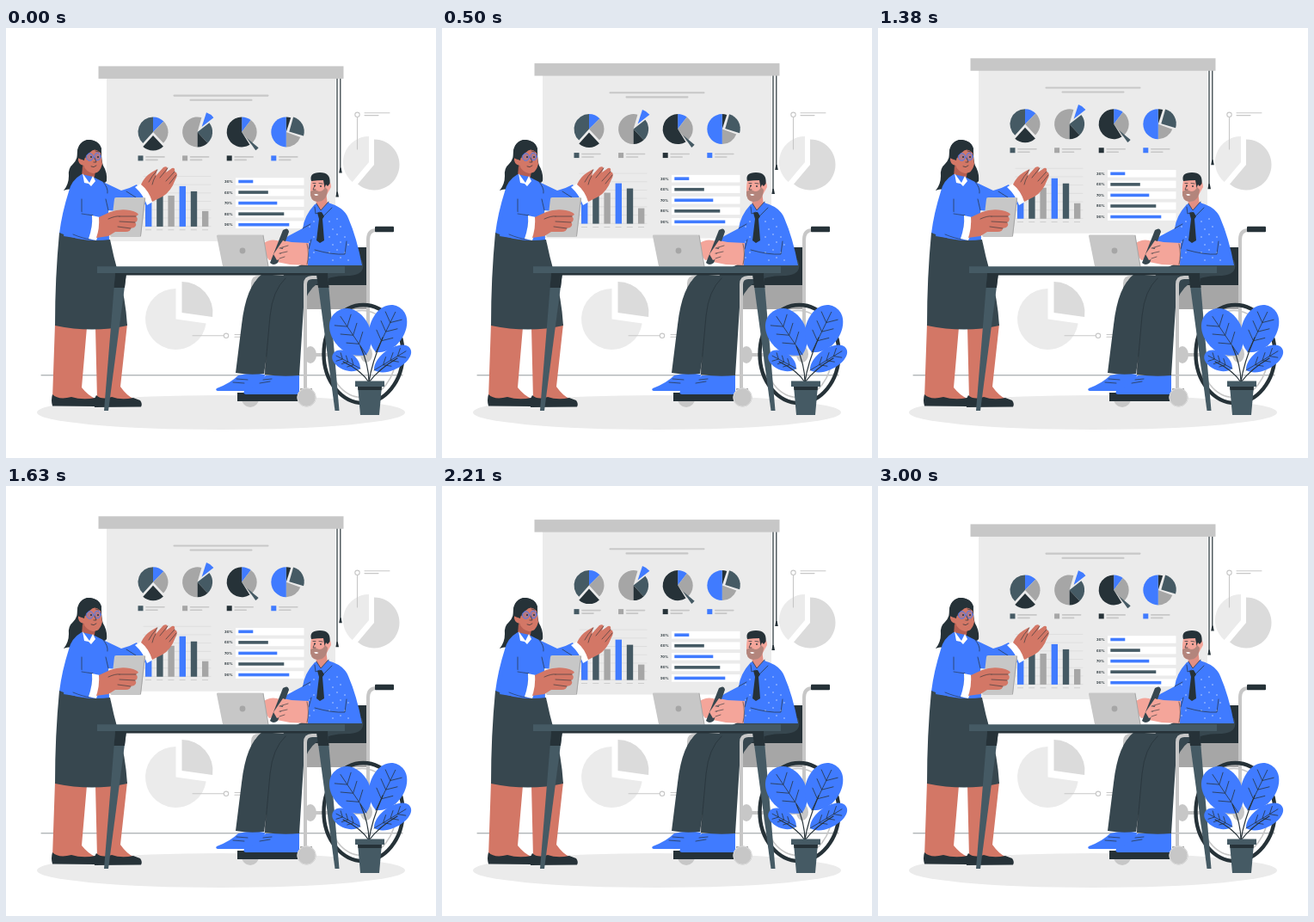
These frames come from a looping animation (500 px wide and 500 px high, 3.04 s). An HTML page:

```html
<!DOCTYPE html>
<html lang="en">
<head>
<meta charset="utf-8">
<style>
html, body { margin: 0; width: 100%; height: 100%; overflow: hidden; background: #fff }
svg { display: block; width: 100vw; height: 100vh }
path, line, ellipse, circle { stroke-linecap: round; stroke-linejoin: round }
.b { fill: #407bff } .d { fill: #263238 } .s { fill: #455a64 } .t { fill: #37474f }
.g { fill: #c7c7c7 } .a { fill: #a6a6a6 } .l { fill: #ebebeb } .w { fill: #fff }
.k { fill: #d37766 } .m { fill: #f4a59a }
.ink { fill: none; stroke: #263238; stroke-width: .7 }
.tube { fill: none; stroke: #c7c7c7; stroke-width: 4 }
.thin { fill: none; stroke: #c7c7c7; stroke-width: 1.1 }
text { font: 700 4.1px Inter, Arial, sans-serif; fill: #263238 }
</style>
</head>
<body>
<svg viewBox="0 0 500 500">
  <ellipse cx="250" cy="447" rx="214" ry="20" class="l"/>
  <path d="M41 403.8H461" class="ink" style="stroke-width:.5"/>

  <g id="backdrop"></g>
  <g class="thin">
    <path d="M408.5 103.6V141M417 98.8H446M417 101.6H433M217 357.8H253M266 356.5H290M266 359.3H280"/>
    <circle cx="408.5" cy="100.8" r="2.7"/>
    <circle cx="256" cy="357.8" r="2.7"/>
  </g>

  <g id="screen">
    <path d="M117 57H383V247.5H117Z" class="l"/>
    <path d="M385 58V192M388.8 58V164" class="ink" style="stroke-width:1.2"/>
    <path d="M384.4 190H385.8L387 196H383.4ZM388.2 162H389.6L390.8 168H387.2Z" class="d"/>
    <rect x="107.5" y="44" width="285" height="14.5" class="g"/>
    <path d="M195.5 78.2H304.5M214.5 83.3H285.5" class="thin" style="stroke-width:2.1"/>
  </g>

  <!-- wheelchair -->
  <g>
    <path d="M287 430V297Q287 290 294 290H303" class="tube"/>
    <circle cx="284" cy="431" r="10" class="g"/>
    <path d="M382 255H419V300H382Z" class="d"/>
    <path d="M349 298H420V327H349Z" class="a"/>
    <path d="M346 286H419V299H346Z" class="d"/>
    <path d="M421 375V246Q421 235 431 235" class="tube"/>
    <rect x="429" y="230.7" width="22" height="6.6" rx="1" class="d"/>
    <path d="M350 380H418M421 330V380" class="tube"/>
    <ellipse cx="354" cy="380" rx="7" ry="10" class="g"/>
    <ellipse cx="419" cy="379" rx="7" ry="10" class="g"/>
    <ellipse cx="415.5" cy="379" rx="46" ry="57" class="ink" style="stroke-width:4.4"/>
    <ellipse cx="414" cy="379" rx="39.5" ry="50.5" class="thin" style="stroke-width:1.6"/>
    <path d="M269 424H345V434H269Z" class="d"/>
  </g>

  <!-- seated man -->
  <g>
    <path d="M245 419Q261 413 270 404Q286 400 301 403L299 422H246Q243 421 245 419Z" class="b"/>
    <path d="M277 422Q293 415 302 404H341V426H279Q275 425 277 422Z" class="b"/>
    <path d="M268 408L281 409M264 412L277 413M299 409L309 408M295 413L307 411" class="ink"/>
    <path d="M298 286Q279 300 274 345L267 401Q283 404 300 402L312 320L345 290Z" class="t"/>
    <path d="M414 270Q420 286 400 288Q352 287 346 325L341 404Q321 406 301 403L306 340Q309 300 327 283L350 272Z" class="t"/>
    <path d="M301 402L307 335Q310 305 325 291" class="ink"/>
    <path d="M300 250Q308 244 319 248L325 266L306 270Q299 262 300 250Z" class="m"/>
    <path d="M359 205Q347 218 345 233L328 242L321 248L329 266L352 257L350 276H414Q408 244 398 221Q393 208 374 203Z" class="b"/>
    <g id="dots" fill="#c9dbff"></g>
    <path d="M345 233L354 228M359 258Q380 264 394 263L396 248M352 257L355 246" class="ink"/>
    <path d="M360 190L372 190L374 206L366 214L361 206Z" fill="#e28f83"/>
    <path d="M361 204L366 212L375 202L379 209L368 219L365 215L360 216L358 207Z" class="b"/>
    <path d="M361 204L366 212L375 202M359 208L360 216L365 214L369 219L379 209" class="ink"/>
    <path d="M362 215L367 214L370 219L368 222L370 247L365 250L361 247L364 222Z" class="d"/>
    <path d="M355 177Q352 196 358 201Q369 205 374 192L378 185Q378 177 373 178L369 172Z" class="m"/>
    <path d="M354 190Q359 187 364 190Q369 190 371 185L374 188Q373 202 362 202Q353 201 354 190Z" fill="#b3857c"/>
    <path d="M358 193.500Q361 192.500 363.500 194Q360 196 358 193.500Z" class="w"/>
    <path d="M355 178Q352 168 365 168Q378 168 376.500 181L374 184L372 182L370.500 186L369 177Q362 177 355 178Z" class="d"/>
    <path d="M357 180.500H360M364 180.500L368 181M359 183L357 188L360 188" class="ink"/>
    <circle cx="359" cy="183.500" r=".9" class="d"/><circle cx="366" cy="184" r=".9" class="d"/>
    <path d="M352 250L332 249L322 247L314 253L310 260L315 272L330 275L351 276Z" class="m"/>
    <path d="M322 235Q328 231 329 237L316 273Q311 277 307 273Z" class="t"/>
    <path d="M322 247Q329 249 328 253L318 257Q325 256 327 260L317 263Q322 262 325 266L315 270L311 263Z" class="m"/>
    <path d="M328 253L318 256M327 260L318 262M324 266L318 268M350 275Q353 263 350 251" class="ink" style="stroke-width:.6"/>
  </g>
  <path d="M348 421V298Q348 290 356 290H366" class="tube"/>
  <path d="M342 419H356V427H342Z" class="a"/>
  <circle cx="349.5" cy="429.5" r="11" class="g"/>
  <circle cx="349.5" cy="429.5" r="10.6" fill="none" stroke="#dbdbdb"/>

  <path d="M246.5 240.5H297Q299 240.5 299.4 242L305 277H252L245 242Q244.8 240.5 246.5 240.5Z" class="g"/>
  <path d="M299 241L305 277" fill="none" stroke="#a6a6a6"/>
  <circle cx="275" cy="259" r="3.4" class="a"/>

  <!-- standing woman -->
  <g>
    <path d="M57 344L94 348L88 418Q95 427 104 431L76 434L54 431Z" class="k"/>
    <path d="M104 348L141 344L133 417Q140 427 148 431L125 434L106 432Z" class="k"/>
    <path d="M54 426Q61 433 76 429Q89 433 104 430L108 435Q110 440 104 440L54 439.5Q52 433 54 426Z" class="d"/>
    <path d="M105 427Q111 433 123 429Q134 433 148 430L156 433Q159 437 157 440.5L103 441Q101 433 105 427Z" class="d"/>
    <path d="M83 143Q86 130 98 130Q111 132 111 144Q111 154 113 160Q118 168 117 178Q114 182 106 181L94 172Q89 180 89 188Q83 193 78 189Q73 186 67 189Q73 182 73 172Q72 163 78 158Q84 152 83 143Z" class="d"/>
    <path d="M89 160L104 166L102 179L94 182L88 173Z" fill="#b55f52"/>
    <path d="M91 142Q102 137 110 145L112 158Q109 170 101 169Q93 167 90 160Q83 158 84 151Q87 147 91 151Z" class="k"/>
    <path d="M83 151Q81 134 94 130Q107 129 111 140L110 145Q103 138 97 145Q91 150 91 154Z" class="d"/>
    <g fill="#407bff" fill-opacity=".2" stroke="#407bff" stroke-width=".9">
      <ellipse cx="97.5" cy="150" rx="4" ry="4.3"/><ellipse cx="106.5" cy="149.500" rx="3.500" ry="4.300"/>
    </g>
    <path d="M87 152L93 150M95 144L99 143M104 143L108 144M103 151L105 156L102 156M99 161Q102 163 105 160" class="ink"/>
    <circle cx="99" cy="150" r="1" class="d"/><circle cx="107" cy="150" r="1" class="d"/>

    <path d="M88 170Q76 177 73 190Q65 215 62 239Q88 250 120 248L119 212Q132 214 140 207L164 205L152 182Q143 187 134 189L113 179L101 173Z" class="b"/>
    <path d="M89 169L97 180L101 172L104 178L99 184L96 181L91 180Z" class="w"/>
    <path d="M88 199L88 216L101 218M113 179Q119 186 118 192M140 190L151 197M119 212L116 199" class="ink"/>
    <path d="M150 185L157 181Q166 189 171 202L164 206Q160 194 150 185Z" class="w"/>
    <path d="M157 182Q161 173 169 168L176 164L174 172L183 162Q187 160 188 163L186 168L193 163Q197 162 196 167L198 168Q200 171 197 176Q192 190 182 196L170 202Q166 189 157 182Z" class="k"/>
    <path d="M174 172Q171 177 170 182M188 163L179 174M196 167L186 178M198 171L190 181M166 179Q169 173 176 165" class="ink" style="stroke-width:.6"/>

    <path d="M62 238Q88 250 121 246Q125 266 131 287Q139 314 141 346Q101 355 57 346Q57 290 62 238Z" class="t"/>
    <path d="M128 197H160Q162 197 162 199L157 241Q157 243 155 243H123Q121 243 121 241L126 199Q126 197 128 197Z" class="g"/>
    <path d="M161.500 198L156.500 242" fill="none" stroke="#a6a6a6"/>
    <path d="M72 209L101 218L99 247L67 242Z" class="b"/>
    <path d="M88 216L101 218L99 246Q90 245 78 240" class="ink" style="stroke-width:.6"/>
    <path d="M100 218L109 220Q110 235 105 247L96 245Q101 231 100 218Z" class="w"/>
    <path d="M108 220L121 214Q132 210 144 212Q153 214 154 217L151 219Q154 221 152 225L150 226Q153 229 149 232L145 233Q145 237 139 237L127 237L119 242L105 244Q109 233 108 220Z" class="k"/>
    <path d="M151 219L132 219M150 226L132 225M145 233L130 231M119 222Q128 218 132 219" class="ink" style="stroke-width:.6"/>
  </g>

  <!-- desk -->
  <path d="M127 285H140L119 445H114Z" class="s"/>
  <path d="M361 285H374L387.5 445H382.5Z" class="s"/>
  <path d="M127 285H140L138 302H125.5ZM361 285H374L375.5 302H363Z" class="d"/>
  <path d="M127 284H374V287.5H127Z" class="d"/>
  <path d="M106 277.3H394V285H106Z" class="s"/>

  <!-- plant -->
  <g id="leaves"></g>
  <path d="M422 412Q422 392 412 370M422 412Q425 390 438 360M422 412Q413 398 392 388M422 412Q434 396 455 384" class="ink" style="stroke-width:1.2"/>
  <path d="M409 416H437L434 450H412Z" class="s"/>
  <path d="M409 416H437L436.600 421H409.500Z" class="d"/>
  <path d="M406 410.500H440V417H406Z" class="s"/>
</svg>
<script>
const BLUE = '#407bff', DARK = '#263238', SLATE = '#455a64', GREY = '#a6a6a6';
const get = id => document.getElementById(id);
const screen = get('screen');
const add = (parent, markup) => parent.insertAdjacentHTML('beforeend', markup);
const rect = (x, y, w, h, fill) =>
  add(screen, `<rect x="${x}" y="${y}" width="${w}" height="${h}" fill="${fill}"/>`);

// Angles in degrees, clockwise from the right
function wedge(parent, x, y, r, from, to, fill) {
  const at = deg => {
    const a = deg * Math.PI / 180;
    return `${x + r * Math.cos(a)} ${y + r * Math.sin(a)}`;
  };
  add(parent, `<path d="M${x} ${y}L${at(from)}A${r} ${r} 0 ${+(to - from > 180)} 1 ${at(to)}Z" fill="${fill}"/>`);
}

const backdrop = get('backdrop');
wedge(backdrop, 428, 159, 29.5, -90, 130, '#dbdbdb');
wedge(backdrop, 422, 156, 30, 130, 270, '#ebebeb');
wedge(backdrop, 197.5, 338.5, 35.5, 8, 270, '#ebebeb');
wedge(backdrop, 204.5, 331, 36, -90, 8, '#dbdbdb');

// Each slice: start, end, colour, offset x, offset y
const pies = [
  [[-90, -45, BLUE], [-45, 47, GREY], [47, 132, DARK, 0, 4], [132, 270, SLATE]],
  [[90, 286, GREY], [-72, -38, BLUE, 5, -6], [-38, 47, SLATE], [47, 90, DARK]],
  [[-90, -53, BLUE], [-53, 54, GREY], [40, 55, SLATE, 6, 7], [58, 270, DARK]],
  [[-90, -72, DARK], [-74, 17, SLATE, 3.5, -.5], [20, 90, GREY], [90, 270, BLUE]]
];
pies.forEach((slices, i) => {
  const x = 171 + i * 51.6;
  for (const [from, to, fill, dx = 0, dy = 0] of slices)
    wedge(screen, x + dx, 120.5 + dy, 17.5, from, to, fill);
  rect(x - 17.5, 148, 6, 6, [SLATE, GREY, DARK, BLUE][i]);
  add(screen, `<path d="M${x - 8} 149.5h21M${x - 8} 153h13" class="thin" style="stroke-width:1.6"/>`);
});

for (let y = 172; y < 232; y += 9.7)
  add(screen, `<path d="M160 ${y}H238" stroke="#d8d8d8" stroke-width=".7"/>`);
[32, 41, 36, 47, 41, 18].forEach((h, i) => {
  const x = 162 + i * 13.2;
  rect(x, 230.5 - h, 7.4, h, [BLUE, SLATE, GREY][i % 3]);
  rect(x, 234, 7, .8, '#c7c7c7');
});

[[30, 17], [60, 34.5], [70, 45], [80, 53], [90, 59]].forEach(([label, w], i) => {
  const y = 178.1 + i * 12.55;
  rect(267, y - 4.3, 79.5, 8.6, '#fff');
  rect(270.3, y - 1.8, w, 3.6, i % 2 ? SLATE : BLUE);
  add(screen, `<text x="254" y="${y + 1.5}">${label}%</text>`);
});

for (let row = 0; row < 6; row++)
  for (let col = 0; col < 6; col++) {
    const x = 349 + col * 9 + row % 2 * 4, y = 222 + row * 9 + col % 2 * 3;
    if (x < 392 + row * 3 && x > 351 && (x < 360 || x > 372))
      add(get('dots'), `<circle cx="${x}" cy="${y}" r=".75"/>`);
  }

// Leaf grows upward from its base, then is turned into place
function leaf(x, y, length, width, turn) {
  let veins = `M0 0V${-length * .88}`;
  for (let k = .25; k < .8; k += .2) {
    const v = -length * k, reach = width * .27;
    veins += `M${-reach} ${v - length * .15}L0 ${v}L${reach} ${v - length * .15}`;
  }
  add(get('leaves'), `<g transform="translate(${x} ${y}) rotate(${turn})">
    <path d="M0 0C${-width * .75} ${-length * .2} ${-width * .65} ${-length} 0 ${-length}C${width * .65} ${-length} ${width * .75} ${-length * .2} 0 0Z" class="b"/>
    <path d="${veins}" class="ink"/></g>`);
}
leaf(419, 380, 61, 42, -34);
leaf(430, 377, 59, 39, 26);
leaf(412, 396, 36, 20, -62);
leaf(428, 398, 49, 23, 59);

// The screen rises 10 px and returns at constant speed, then rests for one step
const LOOP = 3040, SWING = 3000, FPS = 24, REST = .4;
function draw(now) {
  const step = Math.floor((now % LOOP) * FPS / 1000 + .15);
  const p = Math.min(1, step * 1000 / FPS / SWING);
  screen.setAttribute('transform', `translate(0 ${REST - 10 * (1 - Math.abs(1 - 2 * p))})`);
  requestAnimationFrame(draw);
}
draw(performance.now());
</script>
</body>
</html>
```
